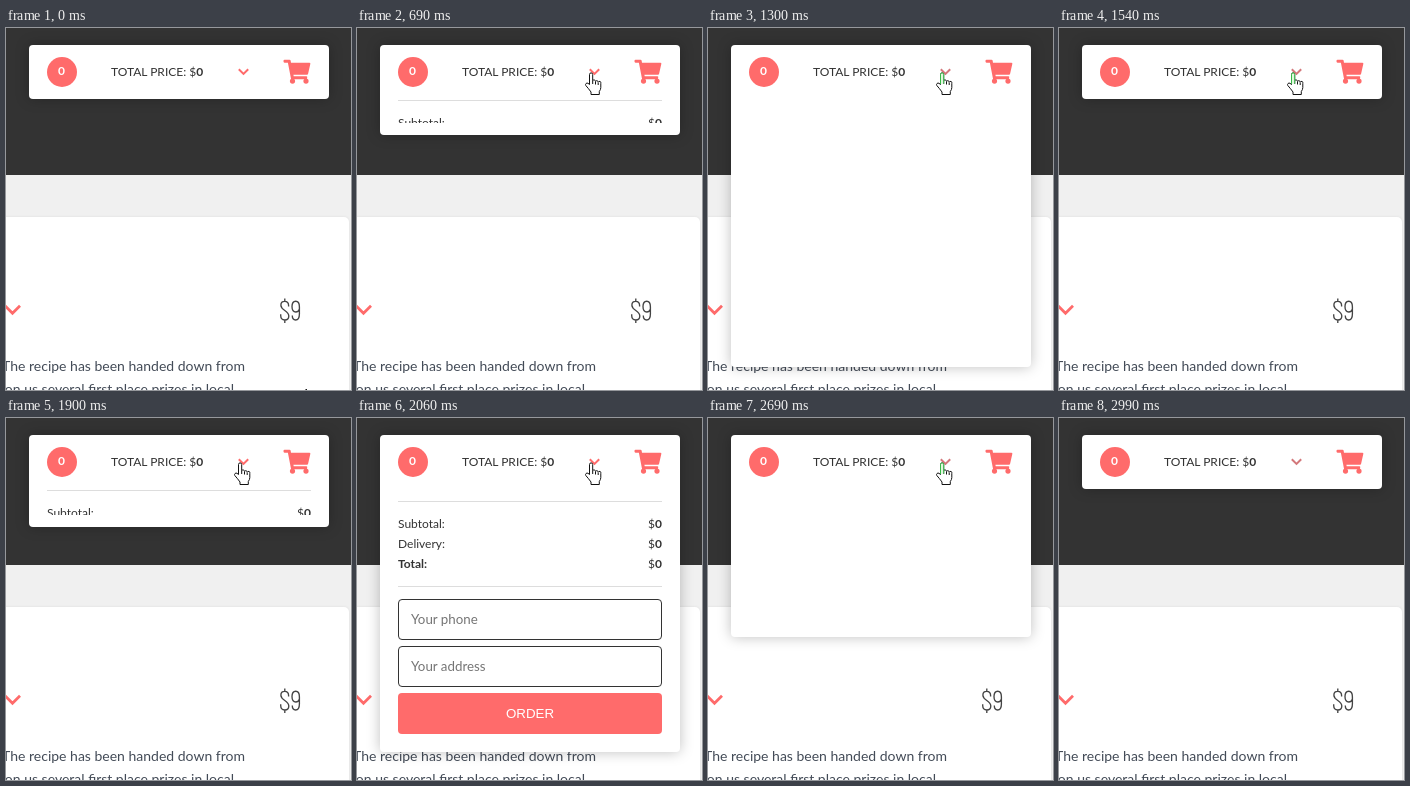
An HTML page that plays this animation: 345 by 362 pixels, repeating every 3450 ms.

```html
<!DOCTYPE html>
<html lang="en">
<head>
<meta charset="utf-8">
<title>Cart dropdown</title>
<style>
  html, body { margin: 0; width: 100%; height: 100%; overflow: hidden; }
  body { position: relative; background: #f0f0f0; color: #333; font: 12px/20px Lato, sans-serif; }
  body * { box-sizing: border-box; }
  .abs, .abs > *, #form, #form > * { position: absolute; white-space: nowrap; }
  svg { position: absolute; left: 0; top: 0; width: 345px; height: 362px; overflow: hidden; }
  .head { left: 0; top: 0; width: 100%; height: 147px; background: #333; }
  .card { left: -10px; top: 189px; width: 353px; height: 190px; background: #fff;
    border-radius: 5px; box-shadow: 0 0 3px rgba(0,0,0,.08); }
  .text { font-size: 14px; line-height: 22px; color: #434b57; }
  #panel { left: 23px; top: 17px; width: 300px; height: 54px; background: #fff;
    border-radius: 4px; box-shadow: 0 0 14px rgba(0,0,0,.25); }
  .count { left: 18px; top: 12px; width: 30px; height: 30px; border-radius: 50%;
    background: #ff6b6b; color: #fff; font-weight: 700; line-height: 28px; text-align: center;
    padding-right: 1px; }
  .total { left: 82px; top: 17px; }
  #clip { left: 0; top: 42px; width: 300px; overflow: hidden; }
  #form { left: 18px; width: 264px; height: 260px; }
  #form .rule { left: 0; width: 264px; height: 1px; background: #ddd; }
  #form .row { left: 0; width: 264px; display: flex; justify-content: space-between; }
  #form .field { left: 0; width: 264px; height: 41px; border: 1px solid #333; border-radius: 4px;
    padding-left: 12px; font-size: 13.33px; line-height: 39px; color: #757575; }
  #form .order { left: 0; top: 192px; width: 264px; height: 41px; border-radius: 4px;
    background: #ff6b6b; color: #fff; text-align: center;
    font: 13.33px/41px "Liberation Sans", Arial, sans-serif; }
</style>
</head>
<body>
<div class="abs head"></div>
<div class="abs card"></div>
<div class="abs text" style="right:calc(100% - 239px);top:327px">The recipe has been handed down from</div>
<div class="abs text" style="right:calc(100% - 228px);top:350px">won us several first place prizes in local</div>
<svg fill="none" stroke="#444" stroke-width="1.35" role="img" aria-label="$9">
  <path d="M-1 277.8L6.5 285.3 14 277.8" stroke="#ff6b6b" stroke-width="2.8"/>
  <path d="M282.6 278.5V277.5Q282.6 273.3 278.7 273.3T274.9 277.3C274.9 282.5 282.8 282.5 282.8 288Q282.8 292 278.8 292T274.7 287.5V286.3M278.8 270.5V273M278.8 292V295"/>
  <path d="M293.2 281.5Q292.4 284 289.8 284 286 284 286 278.6 286 273.2 289.7 273.2 293.4 273.2 293.4 278.8V286Q293.4 292 289.6 292 286.3 292 286.3 287.6"/>
</svg>

<div class="abs" id="panel">
  <div class="count">0</div>
  <div class="total">TOTAL PRICE: $<b>0</b></div>
  <div id="clip">
    <div id="form">
      <div class="rule" style="top:0"></div>
      <div class="row" style="top:13px"><span>Subtotal:</span><span>$<b>0</b></span></div>
      <div class="row" style="top:33px"><span>Delivery:</span><span>$<b>0</b></span></div>
      <div class="row" style="top:53px"><b>Total:</b><span>$<b>0</b></span></div>
      <div class="rule" style="top:85px"></div>
      <div class="field" style="top:98px">Your phone</div>
      <div class="field" style="top:145px">Your address</div>
      <div class="order">ORDER</div>
    </div>
  </div>
</div>

<svg>
  <path id="chevron" d="M232.8 41.2L237.5 45.9 242.2 41.2" fill="none" stroke-width="2"/>
  <g fill="#ff6b6b" transform="translate(-.5 -.3)">
    <path d="M279 32H284a1.1 1.1 0 0 1 1.1.9L285.5 35H303.7a1.1 1.1 0 0 1 1.1 1.4L302.6 46.1a1.1 1.1 0 0 1-1.1.9H287.9L288.2 48.5H300.6a1.1 1.1 0 0 1 1.1 1.4L301.3 51.5H285.6L282.4 35H279a1.1 1.1 0 0 1-1-1.1V33a1.1 1.1 0 0 1 1-1Z"/>
    <circle cx="287" cy="53.4" r="2.6"/><circle cx="300.5" cy="53.4" r="2.6"/>
  </g>
  <g id="cursor" fill="#fff" stroke="#111">
    <path id="arrow" d="M0 0V16L3.7 12.6 6 18 8.3 17 6 11.8H11Z"/>
    <g id="hand" transform="translate(-3.5 -.5)">
      <path d="M5 2a1.6 1.6 0 0 1 3.2 0V8.2a1.5 1.5 0 0 1 2.8.6 1.5 1.5 0 0 1 2.7.9 1.4 1.4 0 0 1 2.6 1.2V15q0 2-1.5 4V22H6.5V19.5Q4 16 1.3 13a1.6 1.6 0 0 1 2.2-2.2L5 12Z"/>
      <path d="M8.2 8V11.5M11 9V12M13.7 10V12.5" fill="none"/>
      <path id="tint" d="M5 11.5V2a1.6 1.6 0 0 1 3.2 0V11" fill="#e0f8dc" stroke="#38b848"/>
    </g>
  </g>
  <circle id="press" cx="231" cy="45" r="12" fill="#2fbf4a" fill-opacity=".4"/>
</svg>

<script>
const LOOP = 3450, CLOSED = 54, GROW = 268, SLIDE = 240;
const ticks = [0, 70, 150, 230, 300, 380, 460, 530, 610, 690, 770, 850, 920, 1130,
  1300, 1380, 1460, 1540, 1820, 1900, 1980, 2060, 2140, 2360,
  2530, 2610, 2690, 2770, 2850, 2920, 2990];
// start, opening?
const slides = [[633, 1], [1300, 0], [1841, 1], [2578, 0]];
const presses = [[610, 690], [1130, 1300], [1820, 1900], [2360, 2530]];
const tinted = [[1130, 1820], [2360, LOOP]];
const filled = [[610, 1300], [1820, 2530]];

const el = id => document.getElementById(id);
const show = (id, on) => { el(id).style.visibility = on ? 'inherit' : 'hidden'; };
const within = (spans, t) => spans.some(([a, b]) => t >= a && t < b);
const clamp = x => Math.min(1, Math.max(0, x));
const swing = p => .5 - Math.cos(Math.PI * clamp(p)) / 2;

function openness(t) {
  let f = 0;
  for (const [start, opening] of slides) {
    if (t < start) break;
    const s = swing((t - start) / SLIDE);
    f = opening ? s : 1 - s;
  }
  return f;
}

function draw(time) {
  const t = ticks.filter(x => x <= time).pop();

  const f = openness(t), height = CLOSED + GROW * f;
  el('panel').style.height = height + 'px';
  el('clip').style.height = height - CLOSED + 'px';
  el('form').style.top = 11.4 + 12.8 * f + 'px';
  show('form', within(filled, t));

  const m = swing(t / 530);
  const x = 300 - 69 * m, y = 361 - 316 * m;
  const over = y < 60;
  el('cursor').setAttribute('transform', `translate(${x.toFixed(1)} ${y.toFixed(1)})`);
  show('cursor', t < 2920);
  show('arrow', !over && t < 2920);
  show('hand', over && t < 2920);

  const green = within(tinted, t);
  show('tint', green && t < 2920);
  show('press', within(presses, t));
  el('chevron').setAttribute('stroke', green ? '#d3787b' : '#ff6b6b');
}

const begin = performance.now();
function frame() {
  draw((performance.now() - begin) % LOOP);
  requestAnimationFrame(frame);
}
frame();
</script>
</body>
</html>
```
